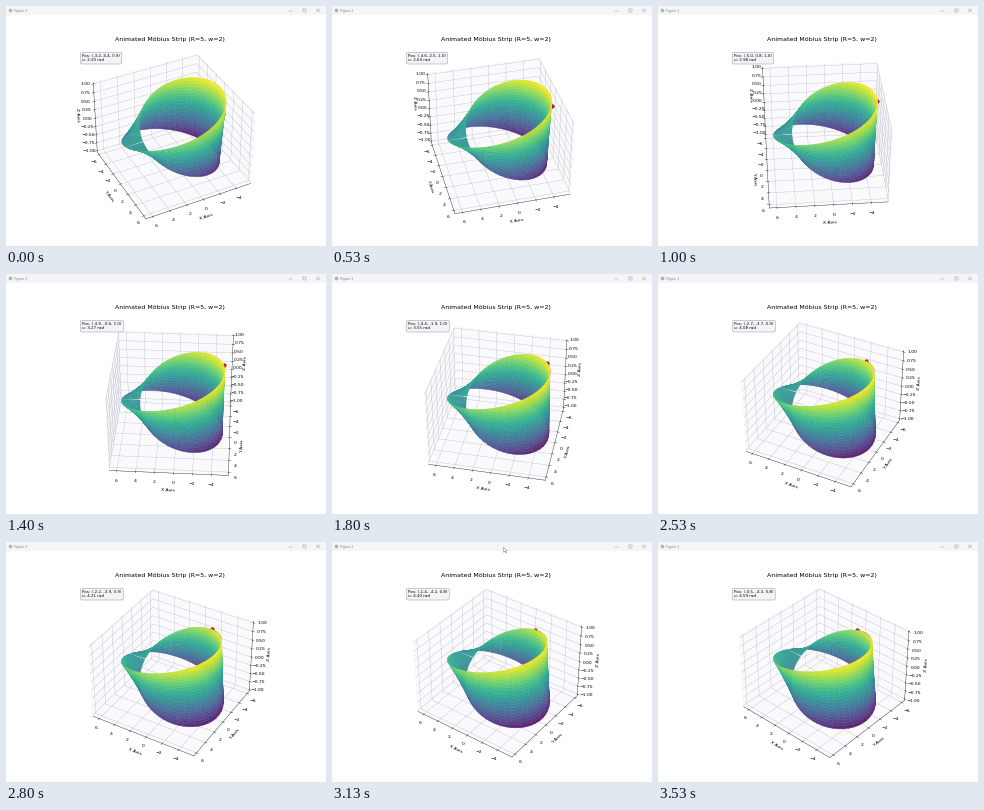
Animation, 320 px wide and 240 px high, one loop 3590 ms. Source, as a matplotlib script:

```python
import numpy as np
import matplotlib.pyplot as plt
from matplotlib.animation import FuncAnimation
from matplotlib.patches import Circle, Polygon, Rectangle

W, H, DPI = 320, 240, 32
FRAMES, LOOP_MS = 54, 3590
R, WIDTH = 5, 2
STEPS = 200
TRAIL = 20
ELEV = 37


def strip(u, v):
    r = R + v * np.cos(u / 2)
    return r * np.cos(u), r * np.sin(u), v * np.sin(u / 2)


def limits(values, margin=0.0):
    lo, hi = values.min(), values.max()
    pad = (hi - lo) * (margin + (1 + 2 * margin) / 48)
    return lo - pad, hi + pad


plt.rcParams["grid.color"] = "#b8b8c4"
fig = plt.figure(figsize=(W / DPI, H / DPI), dpi=DPI, facecolor="white")

# Window frame, drawn in pixels from the top left
frame = fig.add_axes([0, 0, 1, 1], zorder=5)
frame.set(xlim=(0, W), ylim=(H, 0))
frame.axis("off")


def stroke(xs, ys, color="#9c9ca0"):
    frame.plot(xs, ys, color=color, lw=1.1)


frame.add_patch(Rectangle((0, 0), W, 9, fc="#f5f4f7", ec="none"))
frame.add_patch(Circle((4.5, 4.5), 1.8, fc="#a9b3b0", ec="none"))
frame.text(8, 4.6, "Figure 1", fontsize=8.2, color="#8a8a8e",
           family="Liberation Sans", va="center")
stroke([282.5, 285.5], [4.5, 4.5])
stroke([296.5, 299.5, 299.5, 296.5, 296.5], [3, 3, 6, 6, 3])
stroke([310.5, 313.5], [3, 6])
stroke([310.5, 313.5], [6, 3])
frame.text(164, 35, "Animated Möbius Strip (R=5, w=2)", fontsize=14,
           ha="center", va="baseline")
arrow = np.array([(0, 0), (0, 5), (1.2, 4), (2, 5.8), (2.8, 5.4),
                  (2.1, 3.7), (3.6, 3.6)])
cursor = frame.add_patch(Polygon(arrow + (171.5, 5.3), fc="white",
                                 ec="#666666", lw=0.9))

# 3D plot
side, left, bottom = 182, 73, 220.7
ax = fig.add_axes([left / W, 1 - bottom / H, side / W, side / H],
                  projection="3d")

u = np.append(np.arange(0, STEPS - 1, 4), STEPS - 1) * 2 * np.pi / STEPS
v = np.linspace(-WIDTH / 2, WIDTH / 2, 21)
X, Y, Z = strip(*np.meshgrid(u, v, indexing="ij"))
mid = Z.copy()
mid[:-1, :-1] = (Z[:-1, :-1] + Z[1:, :-1] + Z[:-1, 1:] + Z[1:, 1:]) / 4
colors = plt.cm.viridis((mid + 1) / 2)
colors[..., :3] = 0.9 * colors[..., :3] + 0.1
ax.plot_surface(X, Y, Z, rstride=1, cstride=1, facecolors=colors,
                shade=False, linewidth=0.9)

# Lines stay below the surface, so only what passes its edge is seen
trail, = ax.plot([], [], [], color="red", lw=1.5, alpha=0.8)
point, = ax.plot([], [], [], "o", ms=8, mfc="red", mec="black", mew=0.8)
info = ax.text2D(0.017, 0.95, "", transform=ax.transAxes, fontsize=9, va="top",
                 bbox=dict(boxstyle="round,pad=0.4", fc="#f4f4f8",
                           ec="#777777", lw=0.8))

ax.set_xticks(np.arange(-4, 7, 2))
ax.set_yticks(np.arange(-6, 7, 2))
ax.set_zticks(np.linspace(-1, 1, 9))
ax.set_xlim(*limits(X, 0.05))
ax.set_ylim(*limits(Y, 0.05))
ax.set_zlim(*limits(Z))
ax.set_xlabel("X Axis")
ax.set_ylabel("Y Axis")
ax.set_zlabel("Z Axis")
for axis in (ax.xaxis, ax.yaxis, ax.zaxis):
    axis.set_pane_color((0.97, 0.97, 0.98, 0.5))


def step_at(i):
    """Position along the strip; the playback speed drifts a little."""
    return int(round(np.interp(i, [0, 7, 21, 32, 38, 47, 53],
                               [70, 84, 104, 120, 130, 140, 146])))


def update(i):
    k = step_at(i)
    path = np.arange(k - TRAIL, k + 1) * 2 * np.pi / STEPS
    xs, ys, zs = strip(path, WIDTH / 2)
    trail.set_data_3d(xs, ys, zs)
    point.set_data_3d(xs[-1:], ys[-1:], zs[-1:])
    info.set_text(f"Pos: ({xs[-1]:.1f}, {ys[-1]:.1f}, {zs[-1]:.1f})\n"
                  f"u: {path[-1]:.2f} rad")
    ax.view_init(elev=ELEV, azim=0.9 * k)
    cursor.set_visible(45 <= i <= 49)
    return trail, point, info, cursor


anim = FuncAnimation(fig, update, frames=FRAMES, interval=LOOP_MS / FRAMES,
                     repeat=True, repeat_delay=0, blit=False)
plt.show()
```
